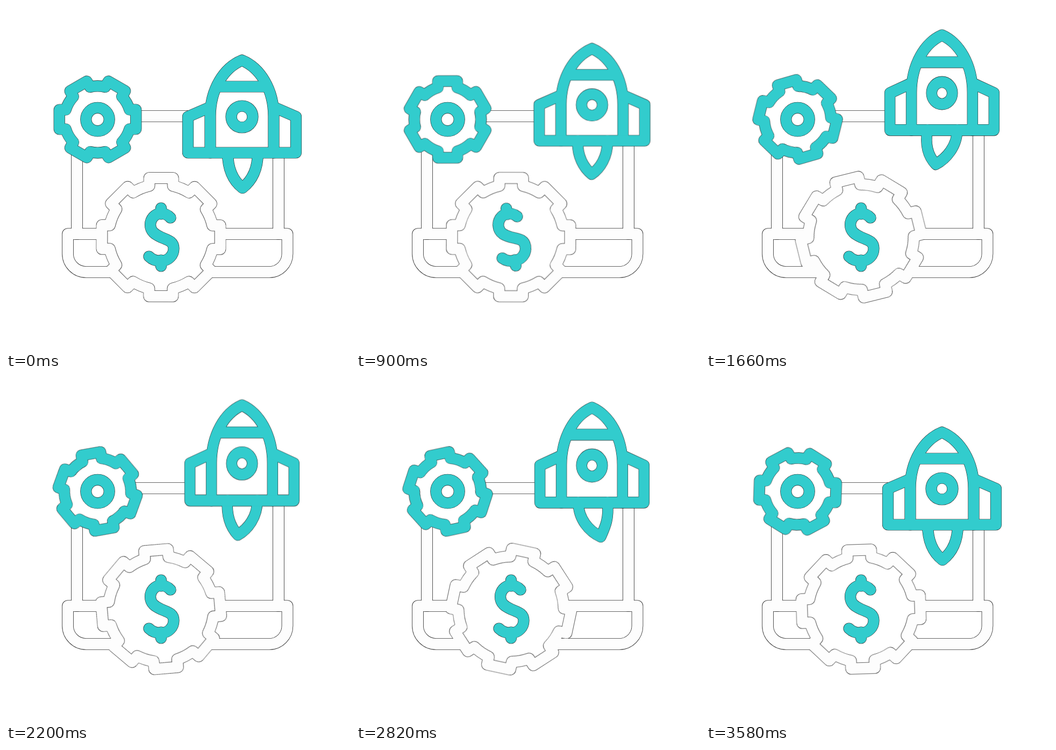
Animation, 640 px wide and 640 px high, one loop 3600 ms. Source, as an HTML page:

```html
<!DOCTYPE html>
<html lang="en">
<head>
<meta charset="utf-8">
<title>Launch</title>
<style>
  html, body { margin: 0; width: 100%; height: 100%; overflow: hidden; background: #fff; }
  svg { display: block; width: 100vw; height: 100vh; }

  .line { fill: none; stroke-linecap: round; stroke-linejoin: round; }
  .teal { stroke: #32cccd; stroke-width: 20px; }
  .teal-edge { stroke: #222; stroke-width: 21.2px; }
  .white { stroke: #fdfdfd; stroke-width: 20px; }
  .white-edge { stroke: #333; stroke-width: 21.7px; }
  .solid { fill: #fff; }

  .cog, .small-cog { animation: turn 3.6s linear infinite; }
  .cog { transform-origin: 288.5px 430px; }
  .small-cog { transform-origin: 170.5px 211px; animation-direction: reverse; }
  .dollar { transform-origin: 288.5px 430px; animation: sway 3.6s ease-in-out infinite; }
  .rocket { transform-origin: 439.5px 187px; animation: fly 3.6s ease-in-out infinite; }
  .flame { animation: flicker 3.6s ease-in-out infinite; }

  @keyframes turn { to { transform: rotate(360deg); } }

  @keyframes sway {
    0%, 42%, 100% { transform: rotate(0deg); }
    19.4% { transform: rotate(-10.8deg); }
  }

  @keyframes fly {
    0%, 97%, 100% { transform: translateY(0) scale(1, 1); }
    16.67% { transform: translateY(1px) scale(.99, .969); }
    33.89% { transform: translateY(-47.5px) scale(.964, 1.026); }
    46.11% { transform: translateY(-44.5px) scale(.964, 1.026); }
    61.11% { transform: translateY(-47.7px) scale(.964, 1.03); }
    78.33% { transform: translateY(-43.7px) scale(.964, 1.026); }
  }

  @keyframes flicker {
    0%, 97%, 100% { d: path("M412.5 273C412.5 305 424 326 440 338.5C456 326 468.5 305 468.5 273"); }
    16.67% { d: path("M412.5 273C412.5 304 428 325 445 336C458 325 469 304 468.5 273"); }
    33.89%, 61.11% { d: path("M411 273C409 300 417 321 431 335C450 325 469 303 468.5 273"); }
    46.11% { d: path("M411 273C406 300 412 320 427 335C447 325 468 303 468.5 273"); }
    78.33% { d: path("M412.5 273C413 303 433 325 456 335C464 318 472 304 469 273"); }
  }
</style>
</head>
<body>
<svg viewBox="0 0 640 640">
  <defs>
    <g id="laptop">
      <path d="M132 424V205H507V424"/>
      <path d="M115 424H523.5V461A33.5 34 0 0 1 490 495H149A34 34 0 0 1 115 461Z"/>
    </g>
    <path id="cog"/>
    <path id="smallCog"/>
    <clipPath id="cogInside"><use href="#cog"/></clipPath>
    <circle id="hub" cx="170.5" cy="211" r="21.7"/>
    <g id="dollar">
      <path d="M306 394C300 387 294 386 288 386C277 386 268.5 396 268.5 407C268.5 420 278 425 288 430C302 436 312 438 312 451C312 464 302 474.5 288 474.5C279 474.5 271 471 266 466"/>
      <path d="M288.5 376V387M288.5 473V484"/>
    </g>
    <path id="hull" d="M380 273V205C380 155 405 115 439 101C473 115 498 155 498 205V273"/>
    <path id="wings" d="M380 188L338.5 206V273H539.5V206L498 188"/>
    <g id="rocket">
      <use href="#hull"/>
      <use href="#wings"/>
      <path d="M392 150H486"/>
      <circle cx="439" cy="206" r="20"/>
    </g>
  </defs>

  <!-- laptop and large cog share one outline -->
  <use href="#laptop" class="line white-edge"/>
  <g class="cog"><use href="#cog" class="line white-edge"/></g>
  <use href="#laptop" class="line white"/>
  <g class="cog">
    <use href="#cog" class="line white solid"/>
    <g clip-path="url(#cogInside)"><use href="#cog" class="line white-edge"/></g>
    <use href="#cog" class="line white"/>
  </g>

  <g class="dollar">
    <use href="#dollar" class="line teal-edge"/>
    <use href="#dollar" class="line teal"/>
  </g>

  <g class="small-cog">
    <use href="#smallCog" class="line teal-edge solid"/>
    <use href="#smallCog" class="line teal"/>
  </g>
  <use href="#hub" class="line teal-edge"/>
  <use href="#hub" class="line teal"/>

  <g class="rocket">
    <path class="flame line teal-edge" d="M412.5 273C412.5 305 424 326 440 338.5C456 326 468.5 305 468.5 273"/>
    <use href="#hull" class="solid"/>
    <use href="#wings" class="solid"/>
    <use href="#rocket" class="line teal-edge"/>
    <path class="flame line teal" d="M412.5 273C412.5 305 424 326 440 338.5C456 326 468.5 305 468.5 273"/>
    <use href="#rocket" class="line teal"/>
  </g>
</svg>
<script>
  // Closed cog outline: flat teeth joined by arcs of the root circle.
  function cogPath(cx, cy, teeth, tip, root, half, start) {
    const foot = Math.sqrt(root * root - half * half);
    let d = '';
    for (let i = 0; i < teeth; i++) {
      const a = start + i * 2 * Math.PI / teeth;
      const at = (x, y) =>
        (cx + x * Math.cos(a) + y * Math.sin(a)).toFixed(2) + ' ' +
        (cy + x * Math.sin(a) - y * Math.cos(a)).toFixed(2);
      d += (i ? `A${root} ${root} 0 0 1 ` : 'M') + at(-half, foot) +
        'L' + at(-half, tip) + 'L' + at(half, tip) + 'L' + at(half, foot);
    }
    const close = `A${root} ${root} 0 0 1 ` + d.slice(1, d.indexOf('L'));
    return d + close + 'Z';
  }

  const setPath = (id, d) => document.getElementById(id).setAttribute('d', d);
  setPath('cog', cogPath(288.5, 430, 8, 110, 98, 22, 0));
  setPath('smallCog', cogPath(170.5, 211, 6, 71.3, 62, 18, Math.PI / 6));
</script>
</body>
</html>
```
